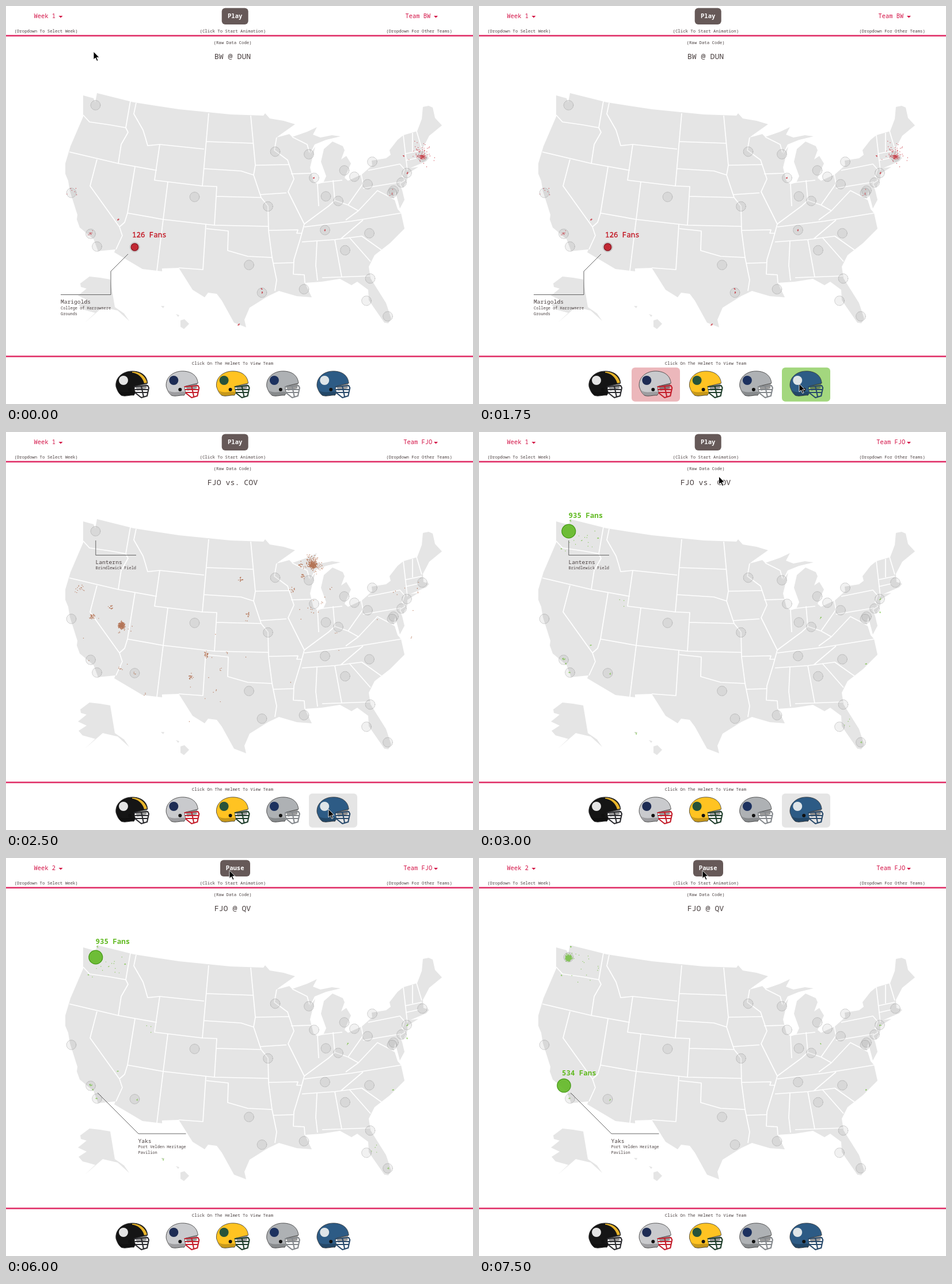
An HTML page for the animation above (8 s loop, 811 px wide and 690 px high).

```html
<!DOCTYPE html>
<html lang="en">
<head>
<meta charset="utf-8">
<title>Fan map</title>
<style>
html, body { margin: 0; width: 100%; height: 100%; overflow: hidden; background: #fff; }
svg { display: block; width: 811px; height: 690px; }
text { font-family: "Noto Sans Mono", "DejaVu Sans Mono", monospace; }
</style>
</head>
<body>
<svg id="stage" viewBox="0 0 811 690" xmlns="http://www.w3.org/2000/svg"></svg>
<script>
const LOOP = 8000, STEP = 250;
const PINK = '#e03068', CRIMSON = '#d31145', INK = '#4a4040';
const RED = [193, 18, 31], GREEN = [98, 186, 35];
const stage = document.getElementById('stage');

function set(el, attrs) {
  for (const k in attrs) el.setAttribute(k, attrs[k]);
  return el;
}
function add(tag, attrs, parent = stage) {
  return parent.appendChild(set(document.createElementNS('http://www.w3.org/2000/svg', tag), attrs));
}
function label(x, y, size, str, fill = INK, more = {}) {
  const el = add('text', { x, y, 'font-size': size, fill, ...more });
  el.textContent = str;
  return el;
}
const show = (el, on) => el.setAttribute('visibility', on ? 'visible' : 'hidden');
const rgb = c => `rgb(${c.map(Math.round)})`;

let seed = 11;
function rnd() {
  seed = (seed * 16807) % 2147483647;
  return seed / 2147483647;
}
const bell = () => (rnd() + rnd() + rnd() + rnd() - 2) * 1.7;

// Coastline by side, clockwise
const land = d => add('path', { d, fill: '#e5e5e5' });
const north = 'M134 155 152 160 155 167 158 151 222 167 300 179 390 188 447 190 450 186 458 195 482 199 502 205 475 224';
const lakes = ' 470 228 492 222 497 227 523 218 540 210 533 223 546 228 566 224 581 226 556 232 536 240 527 258 537 244 528 280 534 304 541 309 551 306 556 295 547 270 552 248 567 235 585 243 588 250 582 266 591 260 599 273 588 298';
const east = ' 594 303 618 292 636 276 635 268 660 264 668 258 666 250 680 232 690 224 714 217 722 196 724 175 734 173 741 176 745 194 757 207 735 225 724 246 725 260 735 263 730 269 702 281 716 279 697 291 697 300 690 315 686 311 692 336 684 351 676 321 673 330 680 352';
const gulf = ' 686 359 692 386 667 411 640 432 630 452 633 472 660 515 669 542 664 550 657 549 630 510 629 492 610 478 600 484 580 473 548 478 519 480 531 505 505 503 474 494 455 503 423 523 414 544 417 557 396 549 375 511 366 499 351 497 345 505 324 492 300 454';
const west = ' 271 455 271 460 237 456 188 427 190 422 160 425 152 404 128 384 123 370 124 362 111 321 108 303 103 291 103 273 112 243 134 192Z';
land(north + lakes + east + gulf + west);
land('M145 469 163 471 181 474 189 522 205 533 214 546 194 528 168 522 137 549 155 532 133 526 126 518 140 509 125 502 140 490 130 487 129 481Z');
land('M303 545 310 543 318 551 309 560 303 556ZM295 534 301 536 299 539ZM269 520h6l-2 4z');

// State borders
const border = d => add('path', { d, fill: 'none', stroke: '#fff', 'stroke-width': 1.7, 'stroke-linejoin': 'round' });
border('M216 165 208 211M134 189 145 201 180 206 208 211 212 219 200 240 195 273M226 168 222 187 238 215 242 228 246 242 267 240 344 248M267 240 258 302 341 312M110 253 195 273 262 285');
border('M158 266 146 312 197 383 202 398 191 422M224 279 211 359 206 375 197 383M211 359 273 370 362 380M281 305 262 459');
border('M352 186 341 312 366 313 362 380M347 379 342 457 300 454M347 235 430 238M344 282 408 286 430 293M365 330 443 332M362 380 455 382M348 386 386 390 385 424 420 434 462 436');
border('M425 190 433 276 430 293 443 332 455 347 456 390 462 436 470 475 467 494M464 446 500 445M433 276 491 275M441 327 487 324M456 389 507 388 505 394 514 394');
border('M470 228 466 250 489 267 500 300 490 322 518 378 511 404 500 440 499 465 518 466 519 480M495 291 530 290M497 227 523 240 527 254M541 309 543 347M568 302 571 337M548 306 584 302M518 378 560 347 571 337 594 345 620 308 617 292');
border('M620 316 686 305M629 285 684 274 692 283 688 295 693 302 684 308 692 326M690 224 697 285M706 220V252M694 256 722 250M694 268 716 263M713 217 722 247M594 345 612 355 645 320 676 336M590 371 612 355');
border('M518 383 600 373 686 359M514 409 571 405 618 399 652 423M581 404 620 371M596 401 633 443M571 405 583 470M549 471 632 468M540 408 538 450 541 476');

// Stadium rings
const points = str => str.split(' ').map(p => p.split(',').map(Number));
points('155.5,172 113.5,324 147,395 158,417 223.5,418 327.5,331 455,347.5 422,449 444.5,497 517.5,491 467.5,252.5 526,257 535,298 555.5,330 577,338 587.5,285 605,296 628,309 636,270 554,388.5 631,394 589,423.5 632.5,472.5 626,511 663,538 670.5,324 673,320 687,306 696,289.5 723,261').forEach(([cx, cy]) =>
  add('circle', { cx, cy, r: 8.3, fill: '#000', 'fill-opacity': .055, stroke: '#777', 'stroke-width': .7, 'stroke-dasharray': '1.6 .9', 'stroke-opacity': .75 }));

// Fans fill one disc, gather in swarms and in small spots
function swarm([x, y, n, s]) {
  return Array.from({ length: n }, () => [x + bell() * s, y + bell() * s]);
}
function crowd([x, y, n, size], swarms, spots, each) {
  const packed = Array.from({ length: n }, (_, i) => {
    const r = size * Math.sqrt((i + .5) / n), a = i * 2.4;
    return [x + r * Math.cos(a), y + r * Math.sin(a)];
  });
  const small = points(spots).map(([px, py]) => [px, py, each, .7]);
  return packed.concat([...swarms, ...small].flatMap(swarm));
}
const start = crowd([223.5, 418, 126, 5],
  [[723, 261, 90, 2.8], [722, 257, 55, 9], [147, 394, 12, 2], [115, 323, 6, 5], [671, 323, 5, 4]],
  '697,290 691,260 535,298 554,389 444,490 445,497 404,552 195,370', 7);
const home = crowd([155.5, 172, 935, 11.3],
  [[178, 184, 18, 12], [147, 394, 12, 1.1], [640, 502, 4, 4], [249, 295, 3, 4]],
  '159,154 207,184 143,203 194,370 151,401 157,417 228,419 697,290 697,313 593,322 672,402 664,538 273,522', 5);
const away = crowd([147.5, 394.5, 534, 11],
  [[155.5, 173, 401, 2.6], [178, 186, 16, 14]],
  '159,154 143,203 157,417 228,419 697,290 593,322 672,402', 5);
const pick = (list, i) => list[i % list.length];
const fans = home.map((p, i) => [pick(start, i * 37), p, i < away.length ? away[i] : pick(away, 534 + i)]);

const disc = add('circle', { 'fill-opacity': .6 });
const dots = add('path', { fill: 'none', 'stroke-width': 1.4, 'stroke-linecap': 'round', opacity: .72 });
const rim = add('circle', { fill: 'none', 'stroke-width': 1.5 });

// Header and footer
[51.5, 607.5].forEach(y => add('rect', { x: 0, y: y - 1.3, width: 811, height: 2.6, fill: PINK }));
const week = label(48.5, 21, 10.4, '', CRIMSON);
const team = label(736, 21, 10.4, '', CRIMSON);
add('path', { d: 'M91.5 17h7l-3.5 3.6zM743 17h7l-3.5 3.6z', fill: CRIMSON });
const button = add('rect', { y: 3.5, height: 28.5, rx: 6, fill: '#665958' });
const buttonText = label(397.7, 21, 10.6, '', '#fff', { 'font-weight': 700, 'text-anchor': 'middle' });
label(14.5, 45.6, 7.35, '(Dropdown To Select Week)');
label(336.5, 45.6, 7.35, '(Click To Start Animation)');
label(660.3, 45.6, 7.35, '(Dropdown For Other Teams)');
label(360.5, 66, 7.35, '(Raw Data Code)');
const title = label(393.5, 92.3, 13.25, '', INK, { 'text-anchor': 'middle' });
label(322.8, 622, 7.37, 'Click On The Helmet To View Team');

function callout(d, x, y, name, lines) {
  return [
    add('path', { d, fill: 'none', stroke: '#555', 'stroke-width': .9 }),
    label(x, y, 9.65, name),
    ...lines.map((s, i) => label(x, y + 9.2 + i * 10.2, 6.92, s))
  ];
}
const callouts = [
  callout('M95 500.5H182V460L212 430', 95, 516.3, 'Marigolds', ['College of Harrowmere', 'Grounds']),
  callout('M155.8 188V213.5H226', 155.5, 229.2, 'Lanterns', ['Brindlewick Field']),
  callout('M159 407L230 478H312.5', 229.5, 493.6, 'Yaks', ['Port Velden Heritage', 'Pavilion'])
];
const count = label(0, 0, 12.45, '');

// Helmets: shell, face mask, round badge
const looks = [
  ['#151515', '#2b2b2f', '#e4e4e4'], ['#c9cacd', '#c41f2c', '#1d2c54'], ['#ffc322', '#1f3d2b', '#27533a'],
  ['#aeb1b4', '#84888c', '#1c315f'], ['#2d5b85', '#294a6b', '#dfe5e8']
];
const plates = looks.map((_, i) => add('rect', { x: 178 + i * 87, y: 626.7, width: 84, height: 59, rx: 6 }));
looks.forEach(([shell, mask, badge], i) => {
  const g = add('g', { transform: `translate(${189 + i * 87.3} 632)` });
  add('path', { d: 'M34 25 56 22 55 31 39 35Z', fill: '#222', 'fill-opacity': .45 }, g);
  add('path', { d: 'M2 28C0 12 14 1 30 1C46 1 56 9 57 22L36 27C33 29 34 34 36 38L33 43C26 42 18 46 11 43C6 39 4 34 2 28Z', fill: shell, stroke: '#333', 'stroke-width': .8 }, g);
  if (!i) add('path', { d: 'M30 2C43 2 53 9 56 21L51 22C48 11 40 5 30 3.5Z', fill: '#e9b52b' }, g);
  add('path', { d: 'M5 34C12 40 24 36 35 37L33 43C26 42 18 46 11 43Z', fill: '#000', 'fill-opacity': .22 }, g);
  add('circle', { cx: 26, cy: 33, r: 3, fill: '#111' }, g);
  add('circle', { cx: 15, cy: 17, r: 8, fill: badge }, g);
  add('path', { d: 'M34 28 57 26 59 30 56 44 46 47 36 39M35 33H58M36 38H57M46 27 50 46', fill: 'none', stroke: mask, 'stroke-width': 2.1, 'stroke-linejoin': 'round', 'stroke-linecap': 'round' }, g);
});

const cursor = add('path', { d: 'M0 0V14L3.3 11 5.8 16.5 8 15.5 5.6 10.2H10Z', fill: '#000', stroke: '#fff', 'stroke-width': .9 });
const trail = [
  [0, 152, 79], [500, 137, 150], [750, 361, 580], [1000, 558, 667], [1250, 580, 664], [1500, 300, 652], [1750, 556, 655],
  [2000, 560, 654], [2750, 480, 300], [3000, 416.5, 77], [3250, 388, 28], [3500, 388, 21.5]
];

const clamp = v => Math.max(0, Math.min(1, v));
const ease = v => v < .5 ? 4 * v ** 3 : 1 - 4 * (1 - v) ** 3;
const mix = (a, b, k) => a + (b - a) * k;

// Disc centre, radius, number of fans, place of the number
const games = [
  { cx: 223.5, cy: 418, r: 6.2, n: 126, x: 219, y: 401 },
  { cx: 155.8, cy: 172, r: 11.8, n: 935, x: 155.5, y: 149.3 },
  { cx: 147.5, cy: 394.5, r: 11.6, n: 534, x: 144, y: 377.3 }
];

function draw(t) {
  const switched = t >= 2250, playing = t >= 3750, next = t >= 6000;
  const stop = next ? 2 : switched ? 1 : 0;
  week.textContent = next ? 'Week 2' : 'Week 1';
  team.textContent = switched ? 'Team FJO' : 'Team BW';
  team.setAttribute('x', switched ? 690.3 : 693.5);
  title.textContent = ['BW @ DUN', 'FJO vs. COV', 'FJO @ QV'][stop];
  buttonText.textContent = playing ? 'Pause' : 'Play';
  set(button, playing ? { x: 372, width: 52 } : { x: 374.7, width: 46 });
  callouts.forEach((parts, i) => parts.forEach(el => show(el, i === stop)));

  const k1 = ease(clamp((t - 2150) / 800)), k2 = ease(clamp((t - 6000) / 1400));
  let d = '';
  for (const [a, b, c] of fans) {
    const [x, y] = [0, 1].map(j => k2 ? mix(b[j], c[j], k2) : mix(a[j], b[j], k1));
    d += `M${x.toFixed(1)} ${y.toFixed(1)}h.01`;
  }
  set(dots, { d, stroke: rgb(RED.map((v, i) => mix(v, GREEN[i], k1))) });

  const rest = t < 2250 || (t >= 3000 && t < 6250) || t >= 7500;
  const tone = rgb(switched ? GREEN : RED);
  const { cx, cy, r, n, x, y } = games[next && t < 6250 ? 1 : stop];
  [disc, rim, count].forEach(el => show(el, rest));
  set(disc, { cx, cy, r, fill: tone });
  set(rim, { cx, cy, r, stroke: switched ? '#4b9e1c' : '#8f1420' });
  count.textContent = n + ' Fans';
  set(count, { x, y, fill: tone, 'font-weight': switched ? 700 : 400, stroke: tone, 'stroke-width': switched ? 0 : .3 });

  const plate = (i, fill, opacity) => set(plates[i], { fill, 'fill-opacity': opacity });
  plates.forEach((_, i) => plate(i, 'none', 0));
  if (t >= 1750 && t < 2000) plate(1, rgb(RED), .3);
  if (t >= 1750 && t < 2250) plate(4, '#67bd28', t < 2000 ? .6 : 1);
  if (switched && !playing) plate(4, '#e5e5e5', 1);

  const [, px, py] = trail.filter(p => p[0] <= t).pop();
  cursor.setAttribute('transform', `translate(${px} ${py})`);
}

let last = -1;
const begin = performance.now();
function tick() {
  const t = Math.floor(((performance.now() - begin) % LOOP) / STEP) * STEP;
  if (t !== last) draw(last = t);
  requestAnimationFrame(tick);
}
tick();
</script>
</body>
</html>
```
